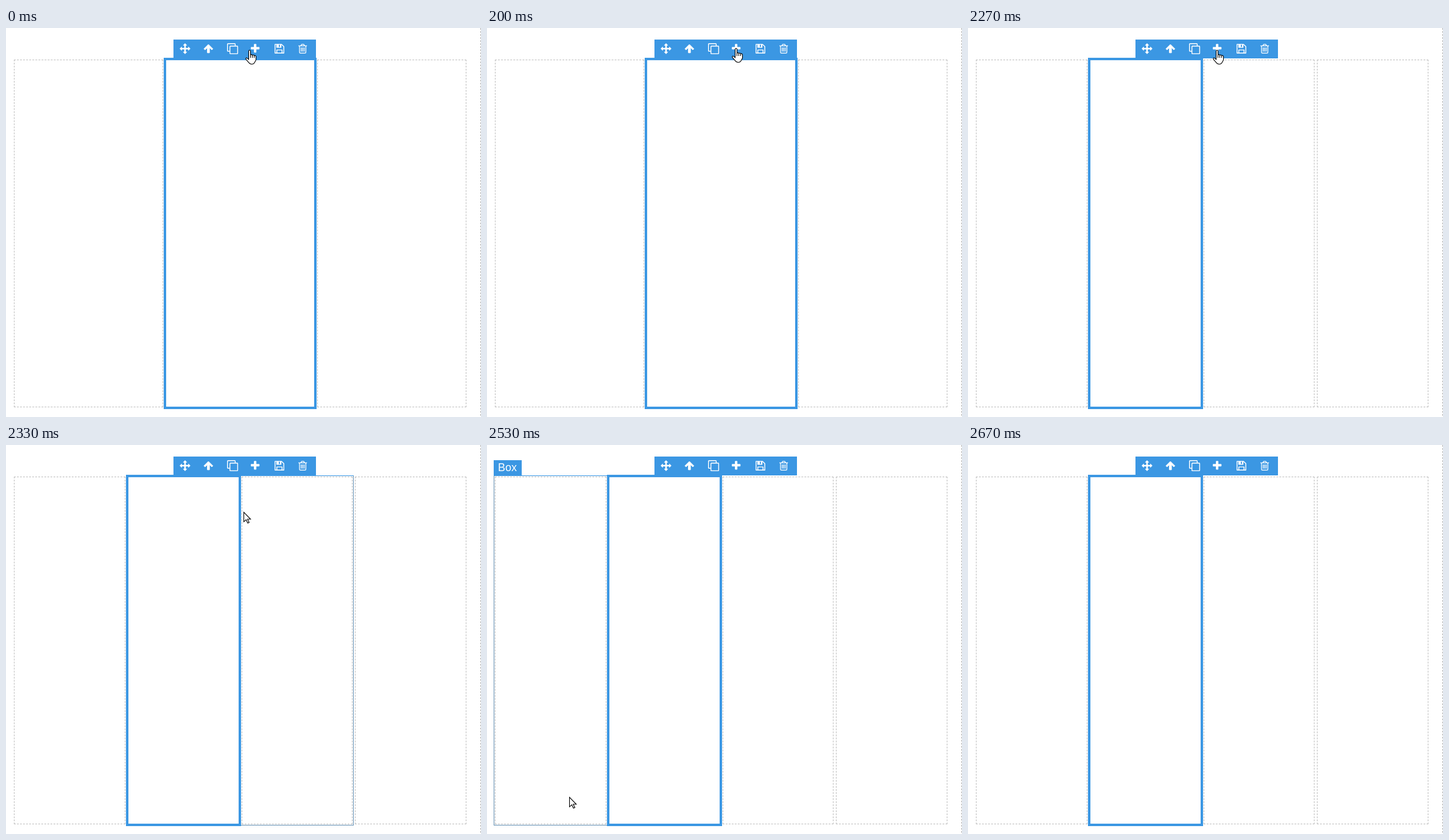
An HTML page that plays this animation: 780 by 640 pixels, repeating every 3.39 s.

```html
<!DOCTYPE html>
<html lang="en">
<head>
<meta charset="utf-8">
<title>Column editor</title>
<style>
  html, body { margin: 0; width: 100%; height: 100%; overflow: hidden; background: #fff; }
  #stage { position: relative; width: 780px; height: 640px; overflow: hidden; --blue: #3b97e3; }
  #stage * { position: absolute; box-sizing: border-box; }
  .cell { top: 52px; height: 572px; border: 1px dashed rgba(170, 170, 170, .75); }
  #edge { left: 0; top: 0; width: 780px; height: 638px; border-right: 1px dashed rgba(170, 170, 170, .9); }
  #hover { top: 50px; height: 576px; border: 1px solid #6490b4; border-top-color: var(--blue); }
  #selected { top: 49px; height: 578px; border: 4px solid var(--blue); }
  #label { top: 25px; width: 46px; height: 25px; padding-left: 7px; background: var(--blue); color: #fff;
    font: 18px/25px "Liberation Sans", Arial, sans-serif; }
  #toolbar { left: 275px; top: 19px; width: 234px; height: 31px; background: var(--blue); }
  svg { left: 0; top: 0; }
</style>
</head>
<body>
<div id="stage">
  <div id="edge"></div>
  <div class="cell"></div><div class="cell"></div><div class="cell"></div><div class="cell"></div>
  <div id="hover"></div>
  <div id="selected"></div>
  <div id="label">Box</div>
  <div id="toolbar"></div>
  <svg width="780" height="640" fill="none" stroke="#fff" stroke-linejoin="round">
    <!-- move -->
    <g transform="translate(294 34)">
      <path fill="#fff" d="M0-8.4L2.7-5.6H-2.7ZM8.4 0L5.6 2.7V-2.7ZM0 8.4L-2.7 5.6H2.7ZM-8.4 0L-5.6-2.7V2.7Z"/>
      <path stroke-width="2.6" d="M0-6V6M-6 0H6"/>
    </g>
    <!-- select parent -->
    <path transform="translate(332.4 34)" fill="#fff"
      d="M0-7L7.3 .3L5.6 2L1.7-1.7V6.8H-1.7V-1.7L-5.6 2L-7.3 .3Z"/>
    <!-- clone -->
    <g stroke-width="1.4">
      <rect x="367.7" y="29.7" width="12.7" height="12.7" rx=".9"/>
      <path d="M376.4 29V26.6a.9.9 0 0 0-.9-.9H364.6a.9.9 0 0 0-.9.9V37.4a.9.9 0 0 0 .9.9H367"/>
    </g>
    <!-- add -->
    <g fill="#fff" stroke="none">
      <rect x="402" y="31.3" width="14.2" height="4" rx="1"/>
      <rect x="407.1" y="26.2" width="4" height="14.2" rx="1"/>
    </g>
    <!-- save -->
    <g stroke-width="1.4">
      <path d="M441.8 26.9H452.5L456.2 30.6V41.2H441.8Z"/>
      <path d="M444.7 27V31.9H451.5V27M444.7 41V36.1H453.3V41"/>
      <path stroke="none" fill="#fff" d="M444.7 27H448V32H444.7ZM449.8 27H451.5V32H449.8Z"/>
    </g>
    <!-- delete -->
    <g stroke-width="1.3">
      <path d="M480.2 29.4H494.2M484.3 29.2L485.1 27.4Q485.4 26.8 486 26.8H488.5Q489.1 26.8 489.4 27.4L490.2 29.2"/>
      <path d="M482 29.5V39.8Q482 41.4 483.4 41.4H491Q492.4 41.4 492.4 39.8V29.5M484.8 32V38.8M487.2 32V38.8M489.6 32V38.8"/>
    </g>
    <g stroke="#000" stroke-width="1.1">
      <g id="hand">
        <path fill="#fff" d="M5.5 14V2.1a1.5 1.6 0 0 1 3 0V8.2q1.5-1.2 3 .4q1.6-1 3 .7q1.8-.7 3 1.2V16.5L15.5 20.3Q14 23.5 10.5 23.5Q7.2 23.5 5.6 20.8L1.2 15.6Q.3 14 1.6 13.3Q3 12.8 4.2 14.6L5.5 16Z"/>
        <path d="M8.5 8V13M11.5 8.6V13M14.5 9.3V13"/>
      </g>
      <path id="arrow" fill="#fff" stroke-linejoin="miter" d="M.5.5V16.3L4.2 12.9L7 18.6L9.3 17.5L6.6 12H11.6Z"/>
    </g>
  </svg>
</div>
<script>
const LOOP = 3390, SPLIT_TIME = 1470;
const LEFT = 11, RIGHT = 758;
const $ = id => document.getElementById(id);
const cells = [...document.querySelectorAll('.cell')];

// Pointer steps: start time, shape, x, y, hovered column
const steps = [
  [0, 'hand', 393, 36],
  [70, 'hand', 396, 35],
  [130, 'hand', 399, 34],
  [200, 'hand', 402, 33],
  [2270, 'hand', 402, 36],
  [2330, 'arrow', 390, 110, 2],
  [2400, 'arrow', 312, 272, 1],
  [2470, 'arrow', 217, 453, 1],
  [2530, 'arrow', 135, 579, 0],
  [2600, 'arrow', 98, 632],
  [2670, 'none', 0, 0]
];

function span(element, from, to) {
  const left = Math.round(from);
  element.style.left = left + 'px';
  element.style.width = Math.round(to) - left + 'px';
}

function show(element, visible) {
  element.style.display = visible ? '' : 'none';
}

function render(time) {
  const count = time < SPLIT_TIME ? 3 : 4;
  const columnX = i => LEFT + (RIGHT - LEFT) * i / count;

  cells.forEach((cell, i) => {
    show(cell, i < count);
    span(cell, columnX(i) + 2, columnX(i + 1) - 2);
  });
  span($('selected'), columnX(1) - 1, columnX(2) + 1);

  const [, shape, x, y, hovered] = steps.findLast(step => step[0] <= time);
  const hovering = hovered !== undefined;
  show($('hover'), hovering);
  show($('label'), hovering);
  if (hovering) {
    span($('hover'), columnX(hovered), columnX(hovered + 1));
    $('label').style.left = Math.round(columnX(hovered)) + 'px';
  }

  for (const name of ['hand', 'arrow']) {
    show($(name), name === shape);
    $(name).setAttribute('transform', `translate(${x} ${y})`);
  }
}

const start = performance.now();
function tick() {
  render((performance.now() - start) % LOOP);
  requestAnimationFrame(tick);
}
tick();
</script>
</body>
</html>
```
